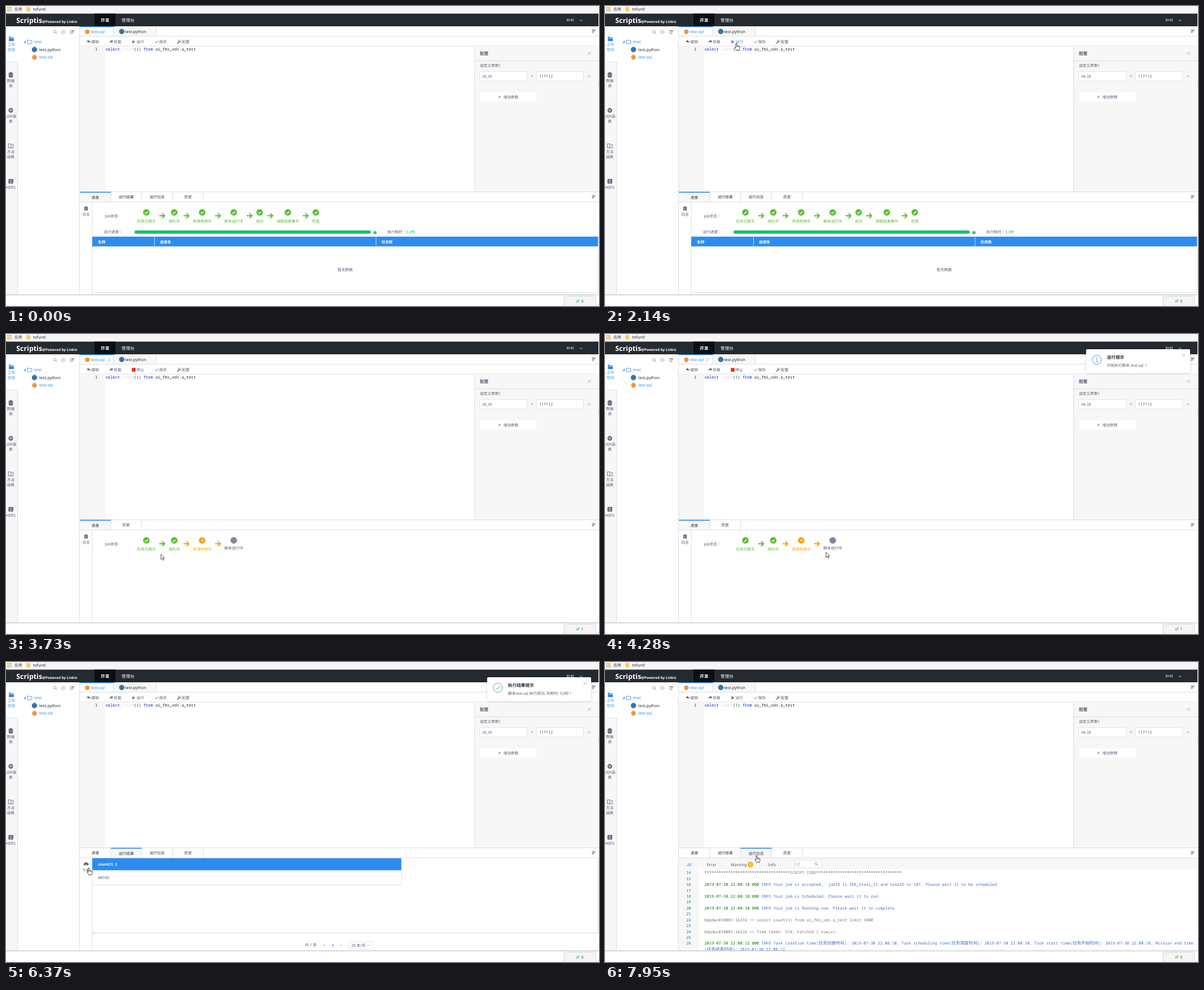
An HTML page for the animation above (8000 ms loop, 1052 by 532 pixels).

```html
<!DOCTYPE html>
<html lang="zh-CN">
<head>
<meta charset="utf-8">
<title>Scriptis</title>
<style>
html, body { margin: 0; width: 100%; height: 100%; overflow: hidden; background: #fff; }
svg { display: block; width: 1052px; height: 532px; }
text { font: 6.7px "Noto Sans", "Noto Sans CJK SC", "Noto Sans CJK", sans-serif; fill: #515a6e; white-space: pre; text-rendering: geometricPrecision; }
.mid { text-anchor: middle; }
.end { text-anchor: end; }
.bold { font-weight: 700; }
.tiny { font-size: 4.6px; }
.s { font-size: 6.3px; }
.l { font-size: 7.1px; }
.xl { font-size: 7.67px; }
.brand { font-size: 12.4px; }
.punct { font-family: "Noto Sans CJK TC", "Noto Sans CJK SC", sans-serif; }
.dark { fill: #23292f; }
.white { fill: #fff; }
.blue { fill: #2d8cf0; }
.green { fill: #55b92c; }
.mint { fill: #19be6b; }
.orange { fill: #ffa000; }
.code { font: 7.04px "Noto Sans Mono", "Noto Sans CJK SC", monospace; fill: #222; }
.word { fill: #0018d0; }
.fn { fill: #fcc8fa; }
.time { fill: #007c00; }
.star { fill: #2c5a2c; }
.info { fill: #4169d8; }
.num { fill: #237893; }
.dim { fill: #777; }
.pale { fill: #b4b8c0; }

/* 1% of the loop is 80 ms */
.done, .submit, .queue, .work, .result, .log, .idle, .hover, .stop, .busy, .one, .none, .start, .ok,
.arrow, .beam, .hand { opacity: 0; animation: 8s step-end infinite; }
.done { animation-name: done; }
.submit { animation-name: submit; }
.queue { animation-name: queue; }
.work { animation-name: work; }
.result { animation-name: result; }
.log { animation-name: log; }
.idle { animation-name: idle; }
.hover { animation-name: hover; }
.stop { animation-name: stop; }
.busy { animation-name: busy; }
.one { animation-name: one; }
.none { animation-name: none-running; }
.start { animation-name: start; }
.ok { animation-name: ok; }
.arrow { animation-name: arrow; }
.beam { animation-name: beam; }
.hand { animation-name: hand; }
.toast { animation: toast 8s ease-in-out infinite; }
.card { filter: drop-shadow(0 .5px 2px rgba(0, 0, 0, .2)); }
.cursor { animation: move 8s infinite; }
.spin { animation: spin 1s steps(12) infinite; }

@keyframes done { 0% { opacity: 1 } 27.75% { opacity: 0 } }
@keyframes submit { 0% { opacity: 0 } 27.75% { opacity: 1 } 46.625% { opacity: 0 } }
@keyframes queue { 0% { opacity: 0 } 46.625% { opacity: 1 } 58.75% { opacity: 0 } }
@keyframes work { 0% { opacity: 0 } 58.75% { opacity: 1 } 72.5% { opacity: 0 } }
@keyframes result { 0% { opacity: 0 } 72.5% { opacity: 1 } 89.375% { opacity: 0 } }
@keyframes log { 0% { opacity: 0 } 89.375% { opacity: 1 } }
@keyframes idle { 0% { opacity: 1 } 25.75% { opacity: 0 } 72.5% { opacity: 1 } }
@keyframes hover { 0% { opacity: 0 } 25.75% { opacity: 1 } 27.75% { opacity: 0 } }
@keyframes stop { 0% { opacity: 0 } 27.75% { opacity: 1 } 72.5% { opacity: 0 } }
@keyframes busy { 0% { opacity: 0 } 35.625% { opacity: 1 } 72.5% { opacity: 0 } }
@keyframes one { 0% { opacity: 0 } 46.625% { opacity: 1 } 72.5% { opacity: 0 } }
@keyframes none-running { 0% { opacity: 1 } 46.625% { opacity: 0 } 72.5% { opacity: 1 } }
@keyframes start { 0% { opacity: 1 } 72.5% { opacity: 0 } }
@keyframes ok { 0% { opacity: 0 } 72.5% { opacity: 1 } }
@keyframes arrow { 0% { opacity: 0 } 6% { opacity: 1 } 12.75% { opacity: 0 } 39% { opacity: 1 } 64% { opacity: 0 } 81% { opacity: 1 } 87% { opacity: 0 } }
@keyframes beam { 0% { opacity: 0 } 14.75% { opacity: 1 } 21.75% { opacity: 0 } 30% { opacity: 1 } 39% { opacity: 0 } }
@keyframes hand { 0% { opacity: 0 } 12.75% { opacity: 1 } 14.75% { opacity: 0 } 21.75% { opacity: 1 } 30% { opacity: 0 } 64% { opacity: 1 } 81% { opacity: 0 } 87% { opacity: 1 } }
@keyframes toast {
  0%, 47.6% { transform: translateX(205px) }
  51.4%, 86.5% { transform: none }
  89.5%, 100% { transform: translateX(205px) }
}
@keyframes spin { to { transform: rotate(360deg) } }
@keyframes move {
  0% { transform: translate(851px, 505px) }
  6% { transform: translate(851px, 505px); animation-timing-function: steps(2) }
  7.75% { transform: translate(566px, 457px) }
  8.75% { transform: translate(566px, 457px); animation-timing-function: steps(4) }
  12.75% { transform: translate(170px, 333px) }
  13.75% { transform: translate(170px, 333px); animation-timing-function: steps(5) }
  18.75% { transform: translate(250px, 190px); animation-timing-function: steps(4) }
  22.75% { transform: translate(280px, 56px) }
  23.75% { transform: translate(280px, 56px); animation-timing-function: steps(3) }
  26.75% { transform: translate(233px, 66px) }
  28.75% { transform: translate(233px, 66px); animation-timing-function: steps(4) }
  32.625% { transform: translate(223px, 267px); animation-timing-function: steps(2) }
  34.625% { transform: translate(222px, 290px); animation-timing-function: steps(11) }
  45.625% { transform: translate(258px, 391px); animation-timing-function: steps(8) }
  53.5% { transform: translate(392px, 387px) }
  55.5% { transform: translate(392px, 387px); animation-timing-function: steps(10) }
  65.375% { transform: translate(135px, 372px); animation-timing-function: steps(3) }
  68.375% { transform: translate(153px, 368px) }
  70% { transform: translate(153px, 368px); animation-timing-function: steps(7) }
  76.875% { transform: translate(147px, 365px) }
  79.625% { transform: translate(147px, 365px); animation-timing-function: steps(9) }
  88.375%, 100% { transform: translate(269px, 343px) }
}
</style>
</head>
<body>
<svg id="stage" viewBox="0 0 1052 532"></svg>
<script>
const BLUE = '#2d8cf0', GREEN = '#5abf2e', MINT = '#19be6b', ORANGE = '#ffa000';
const LINE = '#dcdee2', PALE = '#f7f7f7', INK = '#515a6e', GRAY = '#808695';
const STAR = '#f0963c', PY = '#3672a4';

const span = (c, s) => `<tspan class="${c}">${s}</tspan>`;
// full-width colons and exclamation marks sit in the middle of their cell
const punct = s => s.replace(/[：！]/g, m => `<tspan class="punct" lang="zh-TW">${m}</tspan>`);
const text = (x, y, s, c = '') => `<text x="${x}" y="${y}" class="${c}">${punct(s)}</text>`;
const rect = (x, y, w, h, fill, more = '') => `<rect x="${x}" y="${y}" width="${w}" height="${h}" fill="${fill}" ${more}/>`;
const frame = (x, y, w, h) => rect(x, y, w, h, '#fff', `rx="2" stroke="${LINE}" stroke-width=".8"`);
const disc = (x, y, r, fill) => `<circle cx="${x}" cy="${y}" r="${r}" fill="${fill}"/>`;
const ring = (x, y, r, c, w = .8) => `<circle cx="${x}" cy="${y}" r="${r}" fill="none" stroke="${c}" stroke-width="${w}"/>`;
const line = (d, c = LINE, w = 1) => `<path d="${d}" fill="none" stroke="${c}" stroke-width="${w}"/>`;
const shape = (d, fill) => `<path d="${d}" fill="${fill}"/>`;
const outlined = d => `<path d="${d}" fill="#fff" stroke="#222" stroke-width=".8"/>`;
const at = (x, y, ...parts) => `<g transform="translate(${x} ${y})">${parts.join('')}</g>`;
const group = (c, ...parts) => `<g class="${c}">${parts.join('')}</g>`;

const cross = (x, y, r) => line(`M${x - r} ${y - r}l${2 * r} ${2 * r}m0 ${-2 * r}l${-2 * r} ${2 * r}`, '#999', .7);
const glass = (x, y) => ring(x, y, 2.3, '#777', .7) + line(`M${x + 1.7} ${y + 1.7}l2 2`, '#777', .8);
const menu = y => line(`M1039.5 ${y - 2}h6m-6 1.7h6m-6 1.7h4m-4 1.7h3`, '#555', .8);
const tick = (x, y, k, c = '#fff', w = 1.3) => line(`M${x - 2.6 * k} ${y}l${1.9 * k} ${1.9 * k}l${3.5 * k} ${-3.7 * k}`, c, w);

const chrome = () => [
  rect(0, 0, 1052, 13.5, '#f6f6f6'),
  ...Array.from({ length: 9 }, (_, i) => rect(2.5 + i % 3 * 2.8, 2 + Math.floor(i / 3) * 2.8, 1.9, 1.9, i % 2 ? '#e8935a' : '#f0a030')),
  text(15, 8.4, '应用', 'dark'), rect(36, 2, 7, 7.2, '#f8c763', 'rx="1"'), text(48, 8.3, 'tofund', 'l dark'),
  rect(0, 13.5, 1051, 22.5, '#242a2f'), rect(157, 13.5, 37, 22.5, '#080e14'),
  text(18.3, 30, 'Scriptis' + span('s', '@Powered by Linkis'), 'brand white bold'),
  text(168, 27.6, '开发', 'xl white bold'), text(205, 27.6, '管理台', 'xl white'),
  text(994.3, 27.3, 'tirel', 'l white'), line('M1018 24.5l2.2 2.2l2.2-2.2', '#fff', .8),
];

const sideText = (y, ...rows) => rows.map((s, i) => text(8.5, y + i * 9, s, 'mid')).join('');
const side = () => [
  rect(0, 36, 21, 476, PALE), rect(0, 36, 21, 63, '#fff'),
  line('M0 99.5h21M20.5 99.5V512M130.5 36V512'),
  shape('M5 54.5h3.5l1 1.2h4.5v6.5h-9z', BLUE), line('M5 57.2h9', '#fff', .6),
  text(9.5, 71, '工作', 'mid blue'), text(9.5, 79.5, '空间', 'mid blue'),
  shape('M4.7 119q3.8-3 7.6 0v6.5q-3.8 3-7.6 0z', INK), line('M4.7 120.4q3.8 2 7.6 0m-7.6 2.8q3.8 2 7.6 0', '#fff', .6),
  sideText(134.5, '数据', '库'),
  ring(8.5, 185, 3, INK, 1.8), disc(8.5, 185, 1.1, INK), sideText(197.5, 'UDF函', '数'),
  line('M4.3 244.3h3l.8 1h4.8v6.5H4.3z', INK, .8), text(8.6, 250.4, 'ƒx', 'mid tiny'),
  sideText(260.5, '方法', '函数'),
  rect(4.5, 306.7, 8.2, 8.4, INK, 'rx="1"'), ring(8.6, 310, 1.7, '#fff', .7), line('M6 313.4h5', '#fff', .8),
  sideText(324.3, 'HDFS'),
  glass(86.7, 45.5), ring(101.7, 46, 3.3, '#888', .6), line('M100.2 46h3M101.7 44.5v3', '#888', .6),
  line('M119 44.3a2.6 2.6 0 1 0 .5 2.5', '#444', .9), shape('M119.9 42.7v2.8h-2.8z', '#444'),
  shape('M35 61.5v4h-4z', BLUE), line('M38.3 60.5h2.8l.8 1h4v5.3h-7.6z', BLUE, .8), text(50, 65.6, 'tirel', 'l blue'),
  disc(50.5, 77.2, 4.7, PY), text(59, 79.6, 'test.python', 'l dark'),
  disc(50.5, 91, 4.2, STAR), text(59, 93.4, 'test.sql', 'l blue'),
];

const run = (c, color, cls) => group(c, shape('M224.3 60.3l5 3.2l-5 3.2z', color), text(231.5, 65.6, '运行', cls));
const query = span('word', 'select') + ' ' + span('fn', 'count') + '(' + span('time', '1') + ') ' + span('word', 'from') + ' ai_fmi_ods.a_test';
const editor = () => [
  rect(191, 36.5, 75.5, 17, PALE), line('M191 36v17.5M266.5 36v17.5M131 53.5H1051M131 71H1051'),
  rect(131, 36, 60, 1.4, BLUE),
  disc(144.3, 45.6, 4.2, STAR), text(151, 48.2, 'test.sql', 'l blue'),
  disc(205.3, 45.2, 4.7, PY), text(211, 47.8, 'test.python', 'l dark'),
  group('busy', at(182, 46, group('spin', line('M2.5-.6A2.6 2.6 0 1 1 .6-2.5', '#aaa', .8)))),
  menu(44),
  shape('M143.3 62.6l3.4-2.6v1.7q3.3 0 3.3 4q-1-2-3.3-2v1.7z', '#666'), text(151.5, 65.6, '撤销'),
  shape('M190.2 62.6l-3.4-2.6v1.7q-3.3 0-3.3 4q1-2 3.3-2v1.7z', '#666'), text(191.3, 65.6, '恢复'),
  run('idle', '#777', ''), run('hover', BLUE, 'blue'),
  group('stop', rect(223.3, 60.2, 6.6, 6.6, '#f42a12', 'rx=".6"'), text(231.5, 65.6, '停止')),
  line('M264 63.7l2.1 2.1l4-4.4', '#666', .9), text(271.5, 65.6, '保存'),
  line('M304 66.7l3.7-3.8', '#666', 1.5), line('M309.8 61.2a1.8 1.8 0 1 1-1.4-1', '#666', 1.1), text(312, 65.6, '配置'),
  rect(131, 71.5, 45, 258, '#f6f6f6'), text(162.3, 79.2, '1', 'code end'),
  text(176.4, 79.2, query, 'code'),
  rect(831.5, 71.5, 219.5, 258, PALE), line('M831.5 71V329.5M832 97.2H1051M1051.5 133v10'),
  text(840.7, 86.8, '配置', 'xl bold'), cross(1035, 84, 2.4),
  text(840.7, 108.4, '自定义参数1'),
  frame(840.5, 116.3, 84, 16.7), text(845, 127.3, 'sk_id', 'l'), text(931, 127, '=', 'l'),
  frame(941, 116.3, 83.5, 16.7), text(945.7, 127.3, '117112', 'l'), cross(1033.8, 124.7, 1.6),
  rect(841, 152.8, 100.5, 16.6, '#fff', 'rx="2"'), line('M873.2 161.2h4.6m-2.3-2.3v4.6', '#666', .7), text(882.5, 163.8, '增加参数'),
];

const TAB = 54.8, FULL = ['进度', '运行结果', '运行日志', '历史'], SHORT = ['进度', '历史'];
const tabs = (names, on) => rect(131 + on * TAB, 330, TAB, 17.5, PALE)
  + line('M131 347.5H1051')
  + names.map((s, i) => line(`M${185.8 + i * TAB} 330v17.5`) + text(158.5 + i * TAB, i === on ? 341.6 : 340.8, s, 'mid dark')).join('')
  + rect(131 + on * TAB, 329.5, TAB, 1.6, BLUE);

const steps = [['任务已提交', 249], ['排队中', 298.5], ['资源申请中', 348], ['脚本运行中', 404], ['成功', 450], ['读取结果集中', 500], ['完成', 549.5]];
const arrows = [277, 320, 376, 432, 468.7, 531.5];

// steps before `now` are finished, the one after it waits
const job = now => text(175.4, 375.3, 'Job状态：') + steps.slice(0, now + 2).map(([name, x], i) => {
  const color = i < now ? GREEN : i === now ? ORANGE : GRAY;
  const mark = i < now ? tick(x, 366.2, 1) : i === now ? at(x, 366, shape('M-2.7.2L2.5-2.4L.6 2.8L-.1.5z', '#fff')) : '';
  const cls = i < now ? 'mid green' : i === now ? 'mid orange' : 'mid';
  const arrow = i ? line(`M${arrows[i - 1] - 5} 372h9.3m-4.4-4.5l4.6 4.5l-4.6 4.5`, i < now ? GREEN : ORANGE, 1.8) : '';
  return arrow + disc(x, 366, 5.8, color) + mark + text(x, i > now ? 382 : 383.6, name, cls);
}).join('');

const rail = label => line('M153 348V512') + text(142, 372.3, label, 'mid');
const logRail = () => rail('日志') + rect(139, 355.8, 6, 6.6, INK, 'rx=".8"') + line('M140.3 357.7h3.4m-3.4 1.6h3.4m-3.4 1.6h2', '#fff', .6);

const table = full => text(173.5, 402.6, '运行进度：')
  + rect(228, 398, 419, 5.7, full ? MINT : '#f3f3f3', 'rx="2.8"')
  + (full ? disc(654.6, 402, 2.8, MINT) + tick(654.6, 402, .45, '#fff', .6) + text(676.5, 402.6, '执行耗时：' + span('mint', '3.0秒'))
    : text(650.7, 403.6, '0%'))
  + rect(153, 409, 897.5, 17.3, BLUE) + line('M263.5 409v17.3M656.5 409v17.3', '#cfe4fb', .9)
  + text(163, 420.6, '名称', 'white bold') + text(273, 420.6, '进度条', 'white bold') + text(666, 420.6, '任务数', 'white bold')
  + text(601.7, 470, '暂无数据', 'mid') + line('M153 508.5H1050.5V426');

const result = () => tabs(FULL, 1) + rail('下载')
  + shape('M139.5 360.5a2 2 0 0 1 .2-4a2.6 2.6 0 0 1 4.8 0a2 2 0 0 1 .2 4z', INK) + line('M142 357v2.8m-1.2-1l1.2 1.2l1.2-1.2', '#fff', .7)
  + rect(153, 348, 548.3, 21.3, BLUE) + text(163, 361.2, 'count(1)', 'white bold')
  + shape('M193.3 358.7l2.2-2.3l2.2 2.3z', '#d8e8fa') + shape('M193.3 360.2l2.2 2.3l2.2-2.3z', '#f3d9a0')
  + text(163, 385, '48745', 'l') + line('M153 395.5H701.5V369') + line('M153 480.3H1050.5V348', '#d0d2d6')
  + text(530.4, 504.2, '共 1 条') + line('M566.3 500l-2.4 2.3l2.4 2.3M593.7 500l2.4 2.3l-2.4 2.3', '#888', .7)
  + text(577.7, 505, '1', 'blue bold') + frame(608, 496, 42.7, 13) + text(612.5, 504.8, '20 条/页') + line('M640 501.5l2.2 2.2l2.2-2.2', '#777', .7);

const stamp = (sec, s) => span('time', `2019-07-30 22:00:${sec}.000`) + span('info', ' INFO ' + s);
const when = s => `(${span('xl', s)}): 2019-07-30 22:00:1`;
const stars = span('star', '*'.repeat(36));
const rows = {
  14: stars + span('dim', 'SCRIPT CODE') + stars,
  16: stamp(10, 'Your job is accepted,  jobID is IDE_tirel_11 and taskID is 101. Please wait it to be scheduled'),
  18: stamp(10, 'Your job is Scheduled. Please wait it to run.'),
  20: stamp(10, 'Your job is Running now. Please wait it to complete.'),
  22: span('dim', 'bdpdwc010001:16216 &gt;&gt; select count(1) from ai_fmi_ods.a_test limit 5000'),
  24: span('dim', 'bdpdwc010001:16216 &gt;&gt; Time taken: 518, Fetched 1 row(s).'),
  26: stamp(12, `Task creation time${when('任务创建时间')}0, Task scheduling time${when('任务调度时间')}0, Task start time${when('任务开始时间')}0, Mission end time`),
  27: span('info', when('任务结束时间') + '2'),
};
const rowY = n => 376.3 + (n - 14) * 10.42;
const log = () => tabs(FULL, 2) + rect(131, 348, 920, 19, PALE)
  + text(145.5, 361.7, 'All', 'l blue') + text(180.5, 361.7, 'Error', 'l') + text(223, 361.7, 'Warning', 'l') + text(289.8, 361.7, 'Info', 'l')
  + disc(258, 359.2, 5.3, '#f2c01e') + text(258, 361.6, '1', 'mid white')
  + frame(329.5, 352, 54, 12.6) + text(333, 360.7, '过滤', 'pale') + glass(374.7, 357.6)
  + rect(131, 367, 35, 145, PALE)
  + Array.from({ length: 13 }, (_, i) => text(152.6, rowY(i + 14), `${i + 14}`, 'code end num')).join('')
  + Object.entries(rows).map(([n, s]) => text(176.3, rowY(n), s, 'code')).join('');

const notice = (title, body) => text(890.6, 43.6, title, 'xl bold dark') + text(890.6, 57.8, body);
const toast = () => group('toast',
  group('card', rect(853.5, 27, 184.5, 42.3, '#fff', 'rx="2"')),
  group('start', ring(872.5, 45.6, 8, BLUE, .9), line('M871.5 44h1.4v5m-1.6 0h3.2', BLUE, .8), disc(872.4, 41.8, .7, BLUE), notice('运行提示', '开始执行脚本 test.sql ！')),
  group('ok', ring(872.5, 45.6, 8, MINT, .9), tick(872.2, 45.6, 1.4, MINT, 1), notice('执行结果提示', '脚本test.sql 执行成功, 共耗时: 3.0秒！')),
  cross(1027, 37.8, 2.2));

const footer = () => [
  rect(0, 512, 1052, 20, '#fff'), line('M0 512.2H1051', '#ccced2', 1.5),
  rect(990, 514.5, 56, 20, '#f5f5f5', 'rx="2" stroke="#d2d2d2"'),
  line('M1012 522.2h5.3l-1.6-1.7M1017 524.2h-5.3l1.6 1.7', '#3fbf5f', .9),
  group('none', text(1020.6, 526, '0', 'l')), group('one', text(1020.6, 526, '1', 'l')),
];

const cursor = () => group('cursor',
  group('arrow', outlined('M0 0v9.3l2.2-2l1.5 3.4l1.5-.7l-1.5-3.2h3z')),
  group('beam', line('M-1.8-4h1.3l.5.5l.5-.5h1.3M0-3.5v7M-1.8 4h1.3l.5-.5l.5.5h1.3', '#333', .8)),
  group('hand', outlined('M-1 .8q1-1.4 2 0v4q1-.7 1.8.2q1-.5 1.7.4q1.4-.4 1.5 1v2.4q-.2 1.6-1 2.4v1.3H-.2q-.4-1.6-2.8-4.6q.3-1.5 2 0z'),
    line('M1 5v2M2.8 5.2v1.8M4.5 5.6v1.5', '#222', .6)));

document.getElementById('stage').innerHTML = [
  rect(0, 0, 1052, 532, '#fff'), ...chrome(), ...side(), ...editor(),
  line('M131 329.5H1051'),
  group('done', tabs(FULL, 0), logRail(), job(7), table(true)),
  group('submit', tabs(SHORT, 0), at(-20.7, 0, job(0))),
  group('queue', tabs(SHORT, 0), logRail(), job(2)),
  group('work', tabs(SHORT, 0), logRail(), job(3), table(false)),
  group('result', result()), group('log', log()),
  menu(338), ...footer(), toast(), cursor(),
].join('');
</script>
</body>
</html>
```
